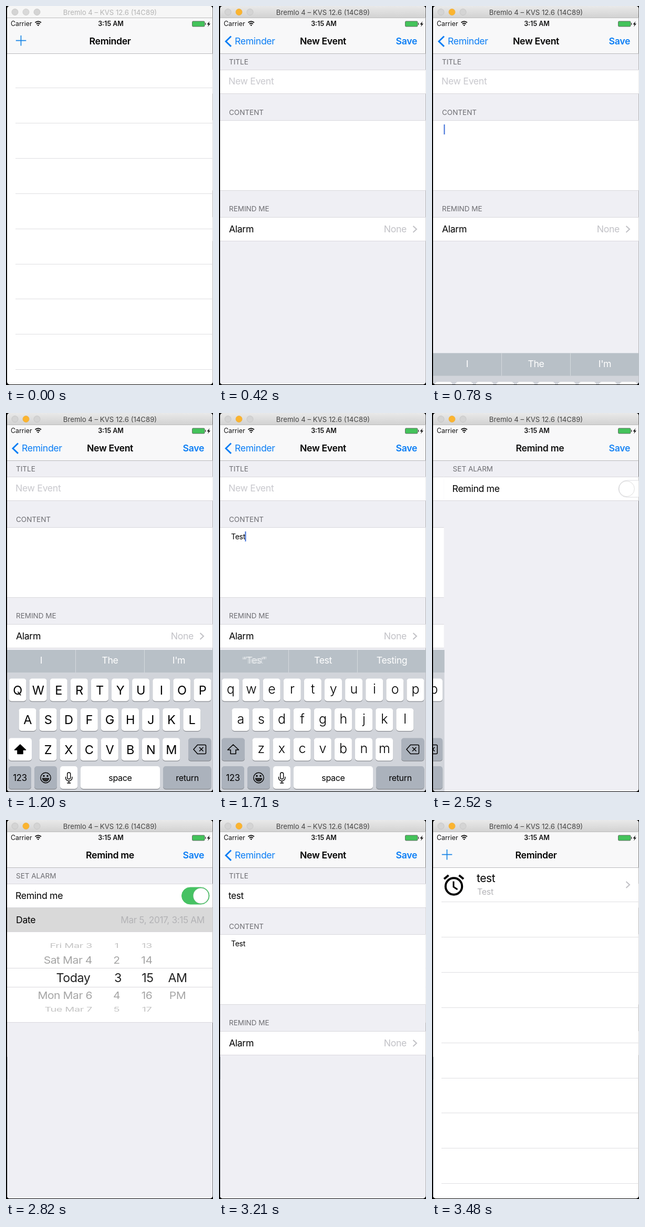
Write an HTML page that moves like this. It is 394 px wide and 720 px high and loops after 3510 ms.

```html
<!DOCTYPE html>
<html lang="en">
<head>
<meta charset="utf-8">
<title>Reminder</title>
<style>
html, body { margin: 0; width: 100%; height: 100%; overflow: hidden; background: #000; }
svg { display: block; width: 394px; height: 720px; }
text { font-family: Inter, "Open Sans", sans-serif; letter-spacing: -.02em; white-space: pre; }
.flat { letter-spacing: 0; }
.bold { font-weight: 600; }
.mid { text-anchor: middle; }
.end { text-anchor: end; }
</style>
</head>
<body>
<svg id="stage" viewBox="0 0 394 720"></svg>
<script>
const LOOP = 3510, STEP = 30, W = 391;
const BLUE = '#0a7df5', GRAY = '#6d6d72', PALE = '#c2c2c7', LINE = '#d9d8dd';

// Markup helpers
const text = (x, y, s, size = 17.7, fill = '#000', cls = '', attr = '') =>
  `<text x="${x}" y="${y}" font-size="${size}" fill="${fill}" class="${cls}" ${attr}>${s}</text>`;
const rect = (x, y, w, h, fill, attr = '') =>
  `<rect x="${x}" y="${y}" width="${w}" height="${h}" fill="${fill}" ${attr}/>`;
const path = (d, stroke, width, fill = 'none', attr = '') =>
  `<path d="${d}" stroke="${stroke}" stroke-width="${width}" fill="${fill}" ${attr}/>`;
const circle = (x, y, r, fill, attr = '') => `<circle cx="${x}" cy="${y}" r="${r}" fill="${fill}" ${attr}/>`;
const group = (id, body, attr = '') => `<g id="${id}" ${attr}>${body}</g>`;
const panel = (y, h) => rect(2, y, 392, h, '#fff') + rect(2, y, 392, 1, LINE) + rect(2, y + h, 392, 1, LINE);
const header = (y, s) => text(19, y, s, 13.5, GRAY, 'flat');
const chevron = y => path(`M369.5 ${y - 6}l6.5 6-6.5 6`, '#c0c0c5', 2);
const title = s => group('', text(198, 73, s, 17.7, '#000', 'bold mid'), 'class="title"');
const save = text(377, 73, 'Save', 17.7, BLUE, 'bold end');

// Screens
function listScreen() {
  let s = rect(2, 90, 392, 630, '#fff');
  for (let i = 0; i < 9; i++) s += rect(18, Math.round(155 + i * 66.9), 376, 1, '#dfdfe2');
  const clock = circle(41.5, 126, 15.7, 'none', 'stroke="#000" stroke-width="4"') +
    path('M41 116.5v10.5l7.5 5', '#000', 3) +
    path('M23 112l8.5-7M60 112l-8.5-7', '#000', 4);
  return s + group('entry', clock + text(85, 118, 'test', 21) +
    text(86, 142, 'Test', 16, '#b4b4b8') + chevron(123));
}

function eventScreen() {
  return rect(2, 90, 392, 630, '#efeff4') +
    header(110.5, 'TITLE') + panel(121, 45) +
    header(206.5, 'CONTENT') + panel(217, 133) +
    header(390, 'REMIND ME') + panel(401, 45) +
    text(18, 149, 'New Event', 17.7, '#c9c9ce', '', 'id="hint"') +
    text(18, 150, '', 17.2, '#000', '', 'id="name"') +
    text(23, 239.5, '', 14, '#000', '', 'id="note"') +
    group('clear', circle(363, 144.5, 7.5, '#c3c3c8') + path('M360 141.5l6 6m0-6l-6 6', '#fff', 1.3)) +
    rect(0, 0, 2, 22, '#3f6fd8', 'id="caret"') +
    text(19, 430, 'Alarm') + text(357, 430, 'None', 17.7, PALE, 'end') + chevron(424);
}

function picker() {
  const rows = [
    ['Fri Mar 3', '1', '13', '', 239, 20, .58, '#c4c4c4'],
    ['Sat Mar 4', '2', '14', '', 266, 21, .88, '#a4a4a4'],
    ['Today', '3', '15', 'AM', 299.5, 23.3, 1, '#222'],
    ['Mon Mar 6', '4', '16', 'PM', 333, 21, .88, '#a4a4a4'],
    ['Tue Mar 7', '5', '17', '', 359.5, 20, .58, '#c4c4c4']
  ];
  const wheel = rows.map(([day, h, m, half, y, size, squash, fill]) => {
    const now = day == 'Today';
    const cell = (x, s, cls) => text(x, size * .36, s, size, fill, cls);
    return `<g transform="translate(0 ${y}) scale(1 ${squash})">` +
      cell(now ? 160.5 : 164, day, 'end') + cell(now ? 213 : 210.5, h, 'mid') +
      cell(now ? 269.5 : 268, m, 'mid') + cell(326.5, half, 'mid') + '</g>';
  }).join('');
  return rect(2, 213, 392, 172, '#fff') + rect(2, 281, 392, 1, LINE) + rect(2, 317, 392, 1, LINE) + wheel;
}

function alarmScreen() {
  const date = rect(2, 167, 392, 46, '#fff') + rect(2, 167, 392, 46, '#d9d9d9', 'id="press"') +
    text(19, 196, 'Date') + text(378, 196, 'Mar 5, 2017, 3:15 AM', 17.2, '#b3b3b6', 'end') +
    rect(2, 212, 392, 1, LINE);
  return rect(2, 90, 392, 630, '#efeff4') + header(110.5, 'SET ALARM') + panel(121, 45) +
    text(18, 150, 'Remind me') +
    rect(334.5, 128, 52.5, 32, '#fff', 'rx="16" stroke="#dcdce0" id="track"') +
    circle(371, 144, 14.7, '#fff', 'stroke="#0002" id="knob"') +
    `<clipPath id="fold">${rect(2, 167, 392, 0, '#000', 'id="foldBox"')}</clipPath>` +
    group('', date + picker(), 'clip-path="url(#fold)"') +
    rect(2, 166, 392, 1, LINE, 'id="foldLine"');
}

// Keyboard
const key = (x, y, w, fill = '#fff', id = '') =>
  rect(x, y + 1.2, w, 43, '#8a8d92', 'rx="5"') + rect(x, y, w, 43, fill, `rx="5" id="${id}"`);

function keyboard() {
  const dark = '#abb2bc';
  let s = rect(2, 450, 392, 270, '#d1d4da') + rect(2, 450, 392, 43, '#b8c0c7') +
    rect(132, 450, 1, 43, '#d5dade') + rect(263, 450, 1, 43, '#d5dade');
  for (const set of ['old', 'new'])
    for (const x of [67, 198, 329]) s += text(x, 476, '', 17.7, '#fff', `mid ${set}`);
  [['qwertyuiop', 22, 504.5], ['asdfghjkl', 41, 561], ['zxcvbnm', 80, 617.5]].forEach(([row, x0, y]) => {
    [...row].forEach((c, i) => {
      const x = x0 + i * 39.1;
      s += key(x - 16.5, y, 33) + text(x, y + 30, c, 25, '#000', 'mid letter');
    });
  });
  s += key(5, 617.5, 44, dark, 'shift') +
    path('M27 630l10.5 10h-5.5v7.500h-10v-7.500h-5.500z', '#000', 1.6, 'none', 'id="arrow" stroke-linejoin="round"');
  s += key(347, 617.5, 43.5, dark) +
    path('M357 639l7.500-8.500h14q2 0 2 2v13q0 2-2 2h-14zM368 635l7.500 7.500m0-7.500l-7.500 7.500', '#000', 1.5);
  s += key(5, 671, 43, dark) + text(26.5, 699, '123', 16.7, '#000', 'mid');
  s += key(54, 671, 43, dark) + circle(75.5, 693, 9.7, 'none', 'stroke="#000" stroke-width="1.4"') +
    circle(72, 689.5, 1.7, '#000') + circle(79, 689.5, 1.7, '#000') +
    path('M69.500 694h12a6 5.500 0 0 1-12 0z', '#000', 1.2, '#333');
  s += key(103, 671, 33) + rect(116.7, 683, 6, 12.5, 'none', 'rx="3" stroke="#000" stroke-width="1.4"') +
    path('M113.500 691v2a6.200 6 0 0 0 12.400 0v-2M119.700 699v4m-3.500 0h7', '#000', 1.4);
  s += key(142, 671, 151) + text(217.5, 698.5, 'space', 16, '#000', 'mid');
  s += key(299, 671, 91.5, dark) + text(345, 698.5, 'return', 16, '#000', 'mid');
  return s;
}

// Bars
function statusBar() {
  return text(9, 38, 'Carrier', 12.4, '#111', 'flat') +
    path('M55.500 31.500q5.700-4.600 11.400 0M57.700 34.200q3.500-2.800 7 0', '#111', 1.9) +
    path('M59.300 36q1.900-1.500 3.800 0l-1.900 2.300z', 'none', 0, '#111') +
    text(199.5, 38, '3:15 AM', 12.5, '#111', 'bold flat mid') +
    rect(354.5, 29, 23.5, 10, '#44c35b', 'rx="1.5" stroke="#555" stroke-width=".8"') +
    rect(379, 32, 1.3, 4, '#444') +
    path('M387.500 29l-5 6h3l-1.500 4.500 5-6h-3z', 'none', 0, '#111');
}

function titleBar() {
  return rect(2, 0, 392, 22.5, 'url(#chrome)', 'id="chromeBox"') + rect(2, 22, 392, 1, '#bcbcbc') +
    [17, 38, 59].map((x, i) => circle(x, 11.5, 6, '#d4d4d4', `stroke="#c2c2c2" stroke-width=".8" id="dot${i}"`)).join('') +
    text(198, 16.5, 'Bremlo 4 – KVS 12.6 (14C89)', 13.2, '#444', 'flat mid', 'id="caption"');
}

const stage = document.getElementById('stage');
stage.innerHTML =
  `<defs><linearGradient id="chrome" x2="0" y2="1"><stop stop-color="#e9e9e9"/><stop offset="1" stop-color="#d2d2d2"/></linearGradient>
  <clipPath id="window">${rect(2, 0, 391.5, 719, '#000', 'rx="5"')}</clipPath></defs>` +
  group('', group('screen0', listScreen()) + group('screen1', eventScreen()) + group('screen2', alarmScreen()) +
    group('keys', keyboard()) +
    rect(2, 22, 392, 68, '#f8f8f9') + rect(2, 90, 392, 1, '#b9b9bc') +
    group('nav0', path('M28.500 56v19.500M18.800 65.700h19.500', '#1684e6', 1.7) + title('Reminder')) +
    group('nav1', path('M23 57.500l-10 9.700 10 9.700', BLUE, 2.9) + text(30, 73, 'Reminder', 17.7, BLUE) + title('New Event') + save) +
    group('nav2', title('Remind me') + save) +
    statusBar() + titleBar(), 'clip-path="url(#window)"');

const el = id => document.getElementById(id);
const all = sel => [...stage.querySelectorAll(sel)];
const set = (node, attrs) => { for (const k in attrs) node.setAttribute(k, attrs[k]); };
const move = (node, x, y = 0) => set(node, { transform: `translate(${x} ${y})` });
const letters = all('.letter'), oldWords = all('.old'), newWords = all('.new');
const navs = [0, 1, 2].map(i => ({ bar: el('nav' + i), title: el('nav' + i).querySelector('.title') }));

// Typing times and word suggestions
const noteTimes = [1350, 1440, 1560, 1650], nameTimes = [1980, 2040, 2100, 2160];
const hints = [
  [0, 'I', 'The', "I'm"],
  [1350, '“T”', 'The', 'This'],
  [1470, '“Te”', 'Tell', 'Text'],
  [1590, '“Tes”', 'Test', 'Testing'],
  [1710, '“Test”', 'Test', 'Testing'],
  [1860, 'I', 'the', "I'm"],
  [2010, '“t”', 'the', 'test'],
  [2280, '“test”', 'tests', 'testing']
];
const typed = (word, times, t) => word.slice(0, times.filter(k => t >= k).length);

function draw(t) {
  const part = (a, b) => Math.min(1, Math.max(0, (t - a) / (b - a)));
  const ease = (a, b) => 1 - (1 - part(a, b)) ** 3;

  // Position in the screen stack: list 0, event 1, alarm 2
  const depth = ease(30, 420) + ease(2370, 2610) - ease(2940, 3180) - ease(3210, 3480);
  navs.forEach((nav, i) => {
    const off = i - depth;
    move(el('screen' + i), off * (off > 0 ? W : 118));
    set(nav.bar, { opacity: Math.max(0, 1 - Math.abs(off) * 1.4) });
    move(nav.title, off * 140);
  });
  set(el('entry'), { opacity: t >= 3000 ? 1 : 0 });

  const active = t >= 30;
  set(el('chromeBox'), { fill: active ? 'url(#chrome)' : '#f6f6f6' });
  set(el('caption'), { fill: active ? '#444' : '#b4b4b4' });
  set(el('dot1'), active ? { fill: '#fbb42f', stroke: '#edac35' } : { fill: '#d9d9d9', stroke: '#c8c8c8' });

  // Keyboard
  const upper = t < noteTimes[0];
  move(el('keys'), -W * ease(2370, 2610), 272 * (1 - ease(750, 1110)));
  letters.forEach(k => {
    k.textContent = upper ? k.textContent.toUpperCase() : k.textContent.toLowerCase();
    set(k, { 'font-size': upper ? 23.5 : 25, 'font-weight': upper ? 400 : 300, dy: upper ? 0 : -1.5 });
  });
  set(el('shift'), { fill: upper ? '#fff' : '#abb2bc' });
  set(el('arrow'), { fill: upper ? '#000' : 'none' });
  const n = hints.filter(h => t >= h[0]).length - 1;
  const now = hints[n], was = hints[Math.max(0, n - 1)];
  const fade = n ? part(now[0] - 30, now[0] + 60) : 1;
  newWords.forEach((w, i) => {
    const same = now[i + 1] == was[i + 1];
    w.textContent = now[i + 1];
    oldWords[i].textContent = was[i + 1];
    set(w, { opacity: same ? 1 : fade });
    set(oldWords[i], { opacity: same ? 0 : 1 - fade });
  });

  // Fields
  const name = typed('test', nameTimes, t);
  el('name').textContent = name;
  el('note').textContent = typed('Test', noteTimes, t);
  set(el('hint'), { opacity: name ? 0 : 1 });
  set(el('clear'), { opacity: name && t < 2370 ? 1 : 0 });
  const inName = t >= 1830, field = el(inName ? 'name' : 'note');
  const width = field.textContent ? field.getComputedTextLength() : 0;
  const shown = t >= 750 && t < 2370 && !(t >= 1200 && t < 1260);
  set(el('caret'), {
    x: (inName ? 18 : 23) + width - .5, y: inName ? 133 : 225, height: inName ? 22 : 19, opacity: shown ? 1 : 0
  });

  // Alarm form
  const on = ease(2610, 2700);
  set(el('knob'), { cx: 350 + 21 * on });
  set(el('track'), { fill: on > .4 ? '#46c263' : '#fff', stroke: on > .4 ? '#46c263' : '#dcdce0' });
  const open = 46 * ease(2640, 2730) + 172 * ease(2730, 2820);
  set(el('foldBox'), { height: open });
  set(el('foldLine'), { y: 166 + open });
  set(el('press'), { opacity: t < 2730 ? 0 : 1 - part(2820, 2880) });
}

const start = performance.now();
function tick() {
  const t = (performance.now() - start) % LOOP;
  draw(Math.floor(t / STEP) * STEP);
  requestAnimationFrame(tick);
}
tick();
</script>
</body>
</html>
```
